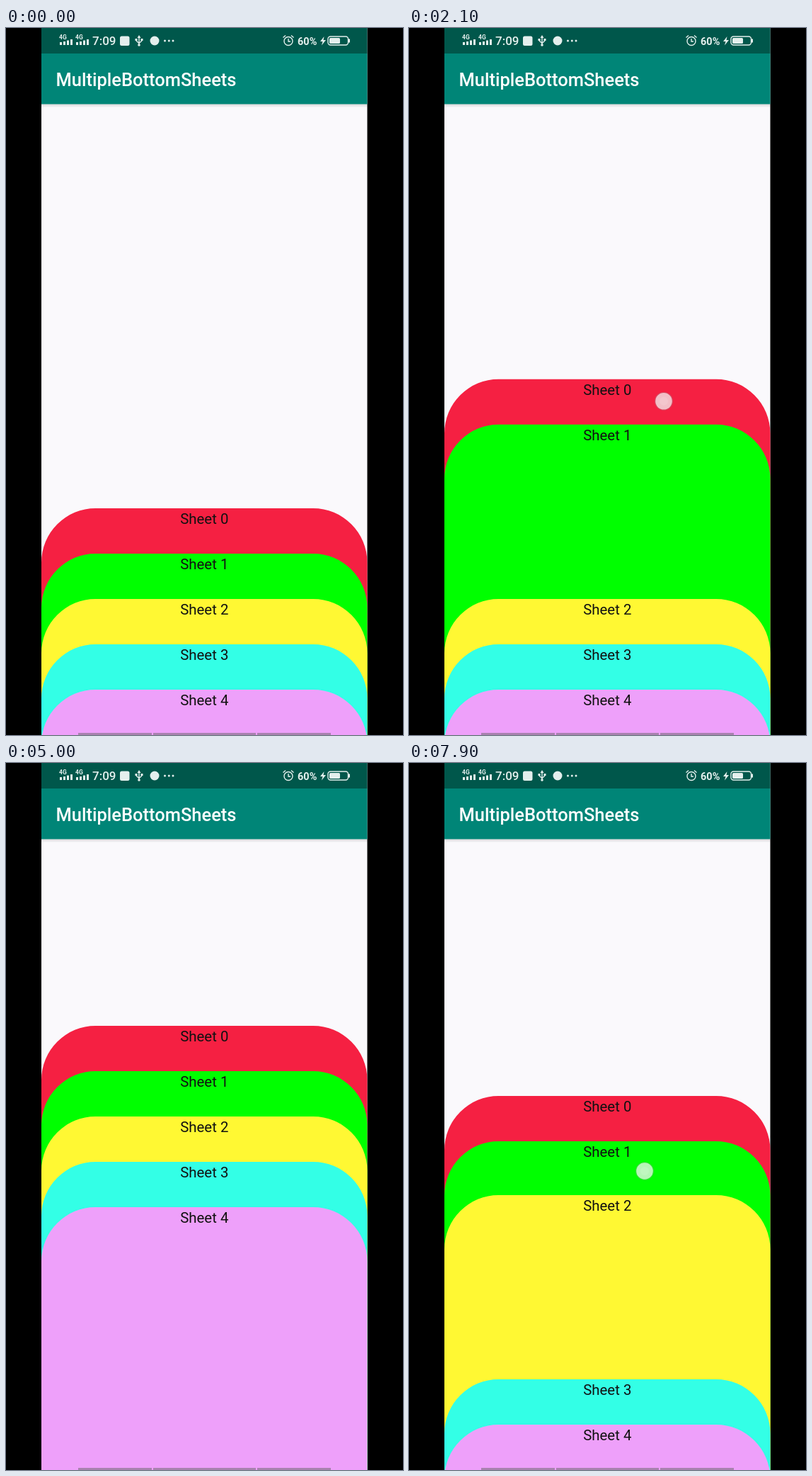
Animation of 561 by 998 pixels, one loop 8 s. Source, as an HTML page:

```html
<!DOCTYPE html>
<html lang="en">
<head>
<meta charset="utf-8">
<title>MultipleBottomSheets</title>
<style>
  html, body { margin: 0; width: 100%; height: 100%; overflow: hidden; background: #000; }
  svg { display: block; font-family: Roboto, sans-serif; }
</style>
</head>
<body>
<svg width="561" height="998" viewBox="0 0 561 998">
  <defs>
    <linearGradient id="shade" x2="0" y2="1">
      <stop stop-opacity=".13"/>
      <stop offset="1" stop-opacity="0"/>
    </linearGradient>
    <g id="signal" fill="#e4efed">
      <text y="16" font-size="8.5" font-weight="700">4G</text>
      <path d="M1 20h3v4h-3zM6 19h3v5h-3zM11 17.5h3v6.500h-3zM16 16h3v8h-3z"/>
    </g>
  </defs>
  <rect x="50" width="460.500" height="998" fill="#faf9fc"/>
  <rect x="50" width="460.500" height="36" fill="#00574b"/>
  <rect x="50" y="36" width="460.500" height="71.500" fill="#008577"/>
  <rect x="50" y="107.500" width="460.500" height="5" fill="url(#shade)"/>
  <text x="70.400" y="81.500" font-size="25.500" font-weight="500" fill="#fff">MultipleBottomSheets</text>

  <g fill="#e4efed">
    <use href="#signal" x="75"/>
    <use href="#signal" x="98"/>
    <text x="122" y="24" font-size="17" font-weight="500">7:09</text>
    <rect x="161" y="11.500" width="13.500" height="13.500" rx="2.500"/>
    <circle cx="210" cy="18" r="6.500"/>
    <circle cx="224.500" cy="18" r="1.500"/>
    <circle cx="230.300" cy="18" r="1.500"/>
    <circle cx="236" cy="18" r="1.500"/>
    <text x="412" y="23.500" font-size="14.500" font-weight="700">60%</text>
    <path d="M449.500 12l-5.500 7h3.500l-1.500 5.500 6-7.500h-3.500z"/>
    <path d="M188 10l2.500 4h-5zM182.500 15h3v3h-3zM190.500 15h3v3h-3z"/>
    <circle cx="188" cy="24" r="1.800"/>
    <rect x="457" y="14" width="15" height="8" rx="1.500"/>
    <rect x="484" y="15.500" width="2" height="5"/>
  </g>
  <g fill="none" stroke="#e4efed" stroke-width="1.400">
    <path d="M188 13v10M184 18l4 3.500 4-3.500"/>
    <rect x="455" y="12" width="28.500" height="12" rx="3.500"/>
    <circle cx="399" cy="18.500" r="6"/>
    <path d="M399 15v4h3M391.500 13.500l3.500-3M406.500 13.500l-3.500-3"/>
  </g>

  <g id="sheets"></g>
  <path d="M102 995h104v3h-104zM208 995h145v3h-145zM355 995h104v3h-104z" fill="#666" opacity=".5"/>
  <g id="touch">
    <circle r="13" fill="#999" opacity=".3"/>
    <circle r="11.800" fill="#fff" opacity=".66"/>
    <circle r="6" fill="#fff" opacity=".12"/>
  </g>
</svg>
<script>
const LOOP = 8000, STEP = 100, GAP = 64, LOW = 678, HIGH = 371;
const colors = ['#f52042', '#00ff00', '#fff833', '#33ffe6', '#eea0fa'];
const low = i => LOW + GAP * i;
const high = i => HIGH + GAP * i;

// Drags: sheet, start ms, end ms, end position, finger x, finger offset below the sheet top
const drags = [
  [2, 340, 1200, high(2), 392, 56],
  [2, 1290, 1750, low(2), 392, 56],
  [0, 1750, 2500, low(0), 360, 31],
  [0, 2738, 3200, high(0), 349, 31],
  [1, 3350, 3600, high(1), 355, 32],
  [2, 3750, 4000, high(2), 360, 32],
  [3, 4150, 4550, high(3), 365, 32],
  [4, 4550, 5000, high(4), 370, 28],
  [0, 5150, 6100, low(0), 370, 31],
  [4, 6155, 6955, high(4), 378, 22],
  [0, 6960, 7400, low(0), 360, 31],
  [2, 7360, 7740, 610, 345, 32],
  [1, 7750, 8050, 522, 333, 42]
];

const layer = document.getElementById('sheets');
const touch = document.getElementById('touch');
layer.innerHTML = colors.map((color, i) => `<g>
  <path d="M50 1000V76.500A76.500 76.500 0 0 1 126.500 0H434A76.500 76.500 0 0 1 510.500 76.500V1000Z" fill="${color}"/>
  <text x="280.300" y="22" font-size="20.400" text-anchor="middle" fill="#111">Sheet ${i}</text>
</g>`).join('');

const ease = p => p < .5 ? 4 * p ** 3 : 1 - 4 * (1 - p) ** 3;

function draw(time) {
  const tops = colors.map((_, i) => low(i));
  let finger = null;
  for (const [sheet, start, end, target, x, grip] of drags) {
    if (time <= start) break;
    const y = tops[sheet] + (target - tops[sheet]) * ease(Math.min(1, (time - start) / (end - start)));
    // A moving sheet pushes its neighbours to keep at least one header visible
    tops.forEach((top, i) => {
      const limit = y + GAP * (i - sheet);
      tops[i] = i < sheet ? Math.min(top, limit) : i > sheet ? Math.max(top, limit) : y;
    });
    if (time < end) finger = [x, y + grip];
  }
  tops.forEach((y, i) => layer.children[i].setAttribute('transform', `translate(0 ${y.toFixed(1)})`));
  touch.setAttribute('visibility', finger ? 'visible' : 'hidden');
  if (finger) touch.setAttribute('transform', `translate(${finger})`);
}

const origin = performance.now();
function tick() {
  const elapsed = (performance.now() - origin) % LOOP;
  draw(Math.floor(elapsed / STEP) * STEP);
  requestAnimationFrame(tick);
}
tick();
</script>
</body>
</html>
```
